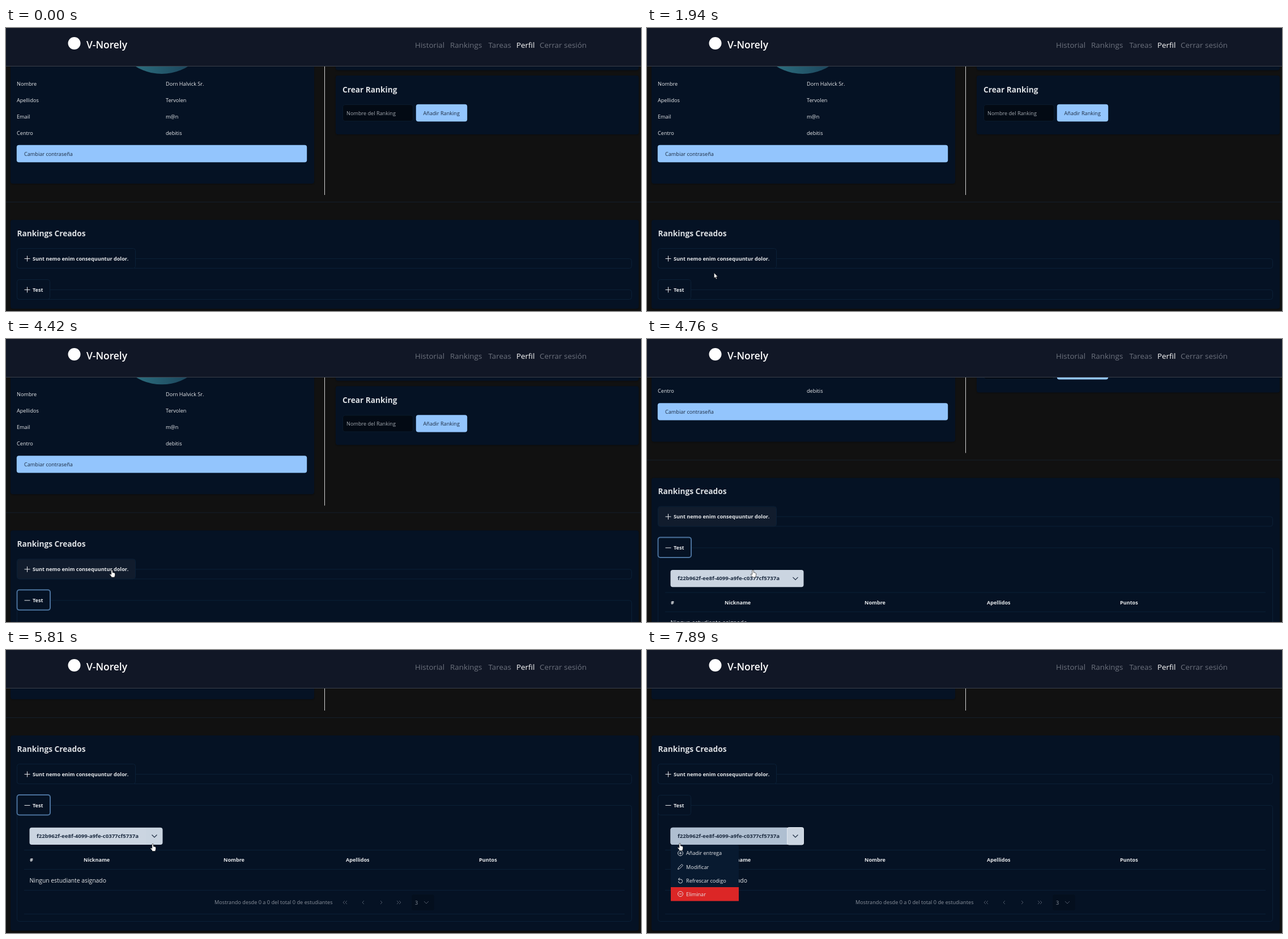
Animation, 1121 px wide and 500 px high, one loop 7990 ms. Source, as an HTML page:

```html
<!DOCTYPE html>
<html lang="es">
<head>
<meta charset="utf-8">
<title>Perfil</title>
<style>
  html, body { margin: 0; width: 100%; height: 100%; overflow: hidden; background: #111; }
  svg { display: block; width: 100%; height: 100%; }
  text { font: 9.15px "Open Sans", "Noto Sans", sans-serif; fill: #e6e8eb; white-space: pre; }
  .b { font-size: 9.08px; font-weight: 700; }
  .h { font-size: 13.7px; font-weight: 700; fill: #dcdfe3; }
  .nav text { font-size: 13.4px; fill: #6c717d; }
  .nav .on { fill: #fff; }
  .nav .brand { font-size: 17.4px; font-weight: 600; fill: #fff; }
  .panel { fill: #051224; }
  .card { filter: drop-shadow(0 1px 1px rgba(0, 0, 0, .3)); }
  .edge { fill: none; stroke: #0b2037; }
  .btn { fill: #93c5fd; }
  .dark { fill: #1c2b40; }
  .dim { fill: #8b929d; }
  .icon { fill: none; stroke: #e6e8eb; }
  .faint { fill: none; stroke: #4d5868; }
  .hover { fill: #111c2d; }
</style>
</head>
<body>
<svg viewBox="0 0 1121 500" preserveAspectRatio="none">
  <defs>
    <linearGradient id="teal" x1=".2" x2=".8">
      <stop stop-color="#2d7080"/><stop offset="1" stop-color="#1b435a"/>
    </linearGradient>
  </defs>

  <g id="page">
    <rect class="panel card" x="8" y="-100" width="536" height="375" rx="4"/>
    <circle cx="275" cy="-7" r="88" fill="url(#teal)"/>
    <text x="19" y="102">Nombre</text><text x="282" y="102">Dorn Halvick Sr.</text>
    <text x="19" y="131">Apellidos</text><text x="282" y="131">Tervolen</text>
    <text x="19" y="160">Email</text><text x="282" y="160">m@n</text>
    <text x="19" y="189">Centro</text><text x="282" y="189">debitis</text>
    <rect class="btn" x="18.8" y="206.8" width="512.4" height="30.4" rx="4"/>
    <text class="dark" x="32" y="226">Cambiar contraseña</text>

    <path d="M562.5 0V295" stroke="#d4d4d4"/>
    <rect class="panel card" x="582" y="-100" width="535" height="174.5" rx="4"/>
    <rect class="panel card" x="582" y="84" width="535" height="104" rx="4"/>
    <text class="h" x="594" y="113.5">Crear Ranking</text>
    <rect x="594.5" y="135.5" width="124" height="29" rx="4" fill="#030a14" stroke="#0a1a2c"/>
    <text x="601" y="154" style="fill:#a3a8b0">Nombre del Ranking</text>
    <rect class="btn" x="723.8" y="134.8" width="90.4" height="30.4" rx="4"/>
    <text class="dark" x="736.5" y="154">Añadir Ranking</text>
    <path d="M0 307.5H1121" stroke="#141f2b"/>

    <rect class="panel card" id="base" x="8" y="339" width="1109" height="157" rx="4"/>
    <text class="h" x="19.5" y="367.5">Rankings Creados</text>

    <rect class="edge" x="19.5" y="407.5" width="1085" height="17" rx="4"/>
    <rect class="panel" x="20" y="390" width="208" height="35" rx="4"/>
    <rect class="hover" id="hoverA" x="20" y="390" width="208" height="35" rx="4"/>
    <rect class="edge" x="19.5" y="389.5" width="209" height="35" rx="4"/>
    <path class="icon" d="M32.5 407.5h10m-5-5v10"/>
    <text class="b" x="47" y="410.8">Sunt nemo enim consequuntur dolor.</text>

    <rect class="edge" id="box" x="19.5" y="462.5" width="1085" height="17" rx="4"/>
    <rect class="panel" x="20" y="445" width="58" height="34" rx="4"/>
    <rect class="hover" id="hoverB" x="20" y="445" width="58" height="34" rx="4"/>
    <rect class="edge" x="19.5" y="444.5" width="58" height="35" rx="4"/>
    <rect id="ring" x="19.5" y="444" width="58.5" height="35.5" rx="4" fill="none" stroke="#4a719b" stroke-width="2"/>
    <path class="icon" d="M32.5 462.5h10"/>
    <path class="icon" id="plus" d="M37.5 457.5v10"/>
    <text class="b" x="47" y="465.8">Test</text>

    <g id="content">
      <rect x="41.5" y="501.7" width="235" height="30.2" rx="4" fill="#cbd5e1"/>
      <path id="hoverL" d="M247 501.7H45.5q-4 0-4 4v22.2q0 4 4 4H247z" fill="#afbfd1"/>
      <path id="hoverR" d="M247 501.7H272.5q4 0 4 4v22.2q0 4-4 4H247z" fill="#c0ccda"/>
      <rect id="ringR" x="247.5" y="501.5" width="29" height="30.5" rx="3" fill="#cbd5e1" stroke="#e2e8f0"/>
      <text class="b dark" x="54" y="520" style="font-size:9.65px">f22b962f-ee8f-4099-a9fe-c0377cf5737a</text>
      <path d="M257.5 514.5l4.5 4.5 4.5-4.5" fill="none" stroke="#1c2b40" stroke-width="1.2"/>
      <path class="edge" d="M32 541.5H1092M32 575.5H1092M32 612.5H1092M32 654.5H1092"/>
      <text class="b" x="42" y="562.3">#</text>
      <text class="b" x="137" y="562.3">Nickname</text>
      <text class="b" x="384" y="562.3">Nombre</text>
      <text class="b" x="600" y="562.3">Apellidos</text>
      <text class="b" x="835" y="562.3">Puntos</text>
      <text x="41.5" y="598.6" style="font-size:10.35px">Ningun estudiante asignado</text>
      <text class="dim" x="368" y="637.3" style="font-size:9.2px">Mostrando desde 0 a 0 del total 0 de estudiantes</text>
      <path class="faint" d="M598 631l-3 3 3 3m4-6l-3 3 3 3M632 631l-3 3 3 3M661 631l3 3-3 3M690 631l3 3-3 3m4-6l3 3-3 3"/>
      <rect x="716" y="620" width="40" height="28" rx="4" fill="#040f1e"/>
      <text class="dim" x="722" y="637.8">3</text>
      <path class="faint" d="M738 632l4 4 4-4"/>
    </g>

    <g id="menu">
      <rect x="42" y="532" width="120" height="100" rx="3" fill="#081a30"/>
      <rect x="42" y="607" width="120" height="24.5" fill="#dc2626"/>
      <g class="icon" stroke-width=".9">
        <circle cx="59" cy="547" r="4.5"/><path d="M56.5 547h5m-2.5-2.5v5"/>
        <path d="M54.5 575.5l1-3 6-6 2 2-6 6z"/>
        <path d="M55.5 593h3.5a3.5 3.5 0 1 1-3.5 3.5M57.5 590.5l-2 2.5 2 2.3"/>
        <circle cx="59" cy="619" r="4.5"/><path d="M56.5 619h5"/>
      </g>
      <text x="69" y="550.3">Añadir entrega</text>
      <text x="69" y="574.5">Modificar</text>
      <text x="69" y="598.5">Refrescar codigo</text>
      <text x="69" y="622.5">Eliminar</text>
    </g>
  </g>

  <g class="nav">
    <rect width="1121" height="68" fill="#111726"/>
    <path d="M0 67.5H1121" stroke="#3b404a"/>
    <circle cx="120.5" cy="27" r="11" fill="#fff"/>
    <text class="brand" x="142" y="36">V-Norely</text>
    <text x="722" y="34.5">Historial</text>
    <text x="784" y="34.5">Rankings</text>
    <text x="851.5" y="34.5">Tareas</text>
    <text class="on" x="901" y="34.5">Perfil</text>
    <text x="942" y="34.5">Cerrar sesión</text>
  </g>

  <g id="cursor" fill="#fff" stroke="#000" stroke-width=".6">
    <path id="arrow" d="M0 0V9.6L2.2 7.6 3.7 11.2 5.2 10.6 3.7 7.1H6.6Z"/>
    <path id="hand" d="M-1.2 1.2Q-1.2 0 0 0T1.2 1.2V4.5Q4.5 4.5 5.6 6.2 6 9.5 4.5 13H-.5Q-2 10-4 8.3-4 6.3-1.2 8Z"/>
  </g>
</svg>

<script>
const LOOP = 7990, OPEN = 3460, MENU = 6280;
const $ = id => document.getElementById(id);
const clamp = v => Math.max(0, Math.min(1, v));
const smooth = p => p * p * (3 - 2 * p);
const show = (id, v) => $(id).setAttribute('opacity', +v);

// Pointer stops: time, x, y
const stops = [
  [20, 1071, 490], [50, 1067, 480], [190, 1067, 480], [830, 113, 431],
  [970, 95, 446], [1300, 138, 460], [1760, 86, 454], [1860, 86, 454],
  [2250, 376, 261], [2640, 244, 300], [3040, 54, 438], [3440, 55, 462],
  [3930, 55, 462], [4250, 187, 408], [5410, 187, 408], [5810, 259, 342.5],
  [6130, 262, 326], [7150, 262, 326], [7890, 58, 341.5]
];

// Times the pointer spends on each control
const onA = [[1950, 2015], [2860, 2990], [4130, 5080]];
const onB = [[3100, 4010]];
const onR = [[5800, 7270]];
const onL = [[7270, 9000]];
const onHand = [...onA, ...onB, [5080, 5420], ...onR, ...onL];

const inside = (spans, t) => spans.some(([a, b]) => t >= a && t < b);
const fade = (spans, t) => Math.max(...spans.map(([a, b]) =>
  clamp(Math.min((t - a) / 150, 1 - (t - b) / 150))));

function pointer(t) {
  const i = stops.findIndex(s => s[0] > t);
  if (i < 0) return stops.at(-1).slice(1);
  const a = stops[Math.max(0, i - 1)], b = stops[i];
  const p = a === b ? 0 : smooth((t - a[0]) / (b[0] - a[0]));
  return [a[1] + (b[1] - a[1]) * p, a[2] + (b[2] - a[2]) * p];
}

// Speeds up to the middle of the way, then slows down
function scroll(t) {
  return t < 4760
    ? 93 * clamp((t - 4390) / 370) ** 2
    : 188 - 95 * clamp((5080 - t) / 320) ** 2;
}

function draw(t) {
  $('page').setAttribute('transform', `translate(0 ${-scroll(t)})`);

  const grow = 188 * smooth(clamp((t - OPEN) / 300));
  $('base').setAttribute('height', 157 + grow);
  $('box').setAttribute('height', 17 + grow);
  show('content', t >= OPEN);
  show('plus', t < OPEN);
  show('ring', fade([[OPEN, MENU]], t));

  show('hoverA', fade(onA, t));
  show('hoverB', fade(onB, t));
  show('hoverL', fade(onL, t));
  show('hoverR', fade(onR, t));
  show('ringR', fade([[MENU, 9000]], t));

  const m = clamp((t - MENU) / 120);
  show('menu', m);
  $('menu').setAttribute('transform', `translate(0 ${532 * .2 * (1 - m)}) scale(1 ${.8 + .2 * m})`);

  const hand = inside(onHand, t);
  show('cursor', t >= 20);
  show('hand', hand);
  show('arrow', !hand);
  $('cursor').setAttribute('transform', `translate(${pointer(t)})`);
}

const start = performance.now();
function tick() {
  draw((performance.now() - start) % LOOP);
  requestAnimationFrame(tick);
}
tick();
</script>
</body>
</html>
```
